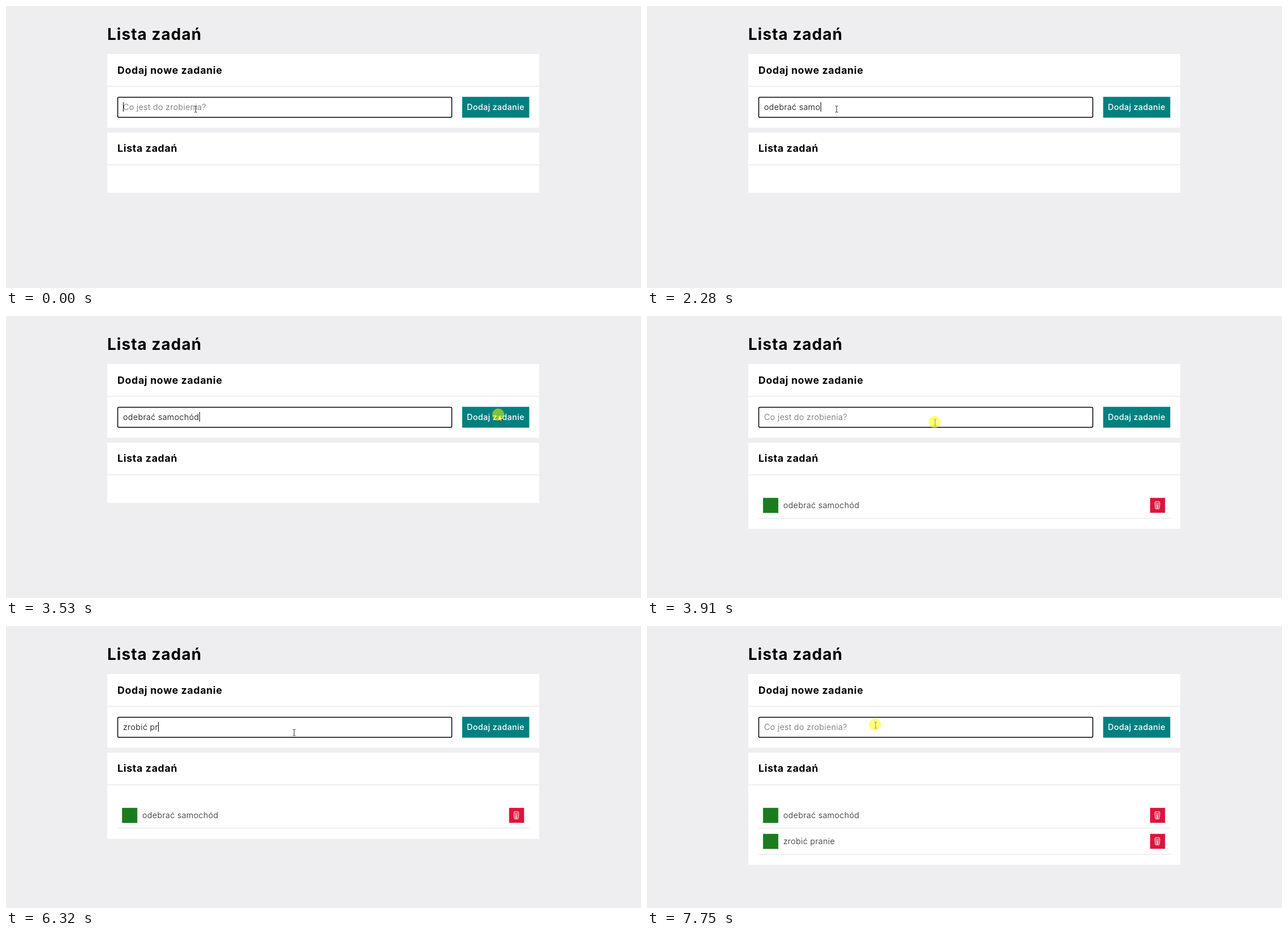
An HTML page that plays this animation: 1123 by 499 pixels, repeating every 8 s.

```html
<!DOCTYPE html>
<html lang="pl">
<head>
<meta charset="utf-8">
<title>Lista zadań</title>
<style>
  html, body { margin: 0; width: 100%; height: 100%; overflow: hidden; background: #eeeef0; }
  svg { display: block; width: 100%; height: 100%; font-family: Inter, "Open Sans", sans-serif; }
  text { font-size: 14.4px; font-weight: 300; letter-spacing: .022em; white-space: pre; }
  .title { font-size: 28px; font-weight: 700; letter-spacing: .036em; }
  .head { font-size: 17.8px; font-weight: 700; letter-spacing: .036em; }
  .label { font-weight: 500; fill: #fff; }
  .item { fill: #222; }
  #hint { fill: #666; }
  .panel { fill: #fff; }
</style>
</head>
<body>
<svg viewBox="0 0 1123 499">
  <defs>
    <g id="bin" fill="none" stroke="#fff" stroke-width=".9">
      <ellipse cx="902.5" cy="329.700" rx="4.600" ry="1.500"/>
      <path d="M898 331l1 10q3.500 1.600 7 0l1-10M900.600 332.500l.5 8M902.500 332.500v8.400M904.400 332.500l-.5 8"/>
    </g>
  </defs>

  <text class="title" x="179" y="60">Lista zadań</text>
  <path class="panel" d="M179 85h764v56h-764zM179 143h764v72.500h-764zM179 224h764v56h-764z"/>
  <rect class="panel" id="list" x="179" y="282" width="764"/>
  <text class="head" x="197" y="119.500">Dodaj nowe zadanie</text>
  <text class="head" x="197" y="258">Lista zadań</text>

  <rect x="197.600" y="161.400" width="590.800" height="35.600" rx="2" fill="#fff" stroke="#000" stroke-width="1.500"/>
  <text id="hint" x="207" y="183.700">Co jest do zrobienia?</text>
  <text id="typed" x="207" y="183.700"></text>
  <rect id="caret" y="170" width="1" height="17"/>

  <rect x="806.700" y="160.700" width="118.700" height="36.900" fill="teal"/>
  <text class="label" x="815" y="183.700">Dodaj zadanie</text>

  <g id="items"></g>

  <path id="beam" d="M-2.500 -5.500h2l.5.5.5-.5h2M0-5V5M-2.500 5.500h2l.5-.5.5.5h2" fill="none" stroke="#333"/>
  <path id="arrow" d="M0 0v11l2.600-2.400 1.900 4 1.800-.8-1.900-3.900h3.500z" fill="#fff" stroke="#000" stroke-width=".8"/>
  <circle id="halo" r="10.700" fill="#ff0" fill-opacity=".5"/>
</svg>
<script>
const LOOP = 8000;
const ROW = 46;

// Each round: the pointer rests over the field, a task is typed, the button is clicked.
// In keys, "|" separates bursts of letters and "_" is a silent beat.
const rounds = [
  { opens: 0, focus: 0, types: 210, click: 3530, blur: 3910,
    keys: "od|eb|ra|ć| |s|a|mo|c|hó|d", field: [335, 182], button: [871, 175] },
  { opens: 3910, focus: 4290, types: 4670, click: 7370, blur: 7370,
    keys: "zr|ob|_i|ć| |pr|a|n|i|e", field: [509, 188], button: [879, 177] },
  { opens: 7750, focus: LOOP, types: LOOP, click: LOOP, blur: LOOP,
    keys: "", field: [404, 175] }
];

const el = id => document.getElementById(id);
const show = (node, on) => node.style.display = on ? "" : "none";
const letters = keys => keys.replace(/[|_]/g, "");
const burstTime = burst => 10 + 200 * burst.length;

function typedBy(t, { keys, types }) {
  const bursts = keys.split("|");
  let due = types - burstTime(bursts[0]);
  return letters(bursts.filter(burst => (due += burstTime(burst)) <= t).join(""));
}

el("items").innerHTML = rounds.slice(0, -1).map(({ keys }, i) => `
  <g transform="translate(0 ${i * ROW})">
    <rect x="205.200" y="321.800" width="27" height="26.700" fill="#1a7c1f"/>
    <text class="item" x="241" y="340">${letters(keys)}</text>
    <rect x="889.700" y="321.800" width="26.500" height="26.500" fill="crimson"/>
    <use href="#bin"/>
    <rect x="197" y="357" width="728.500" height="1.800" fill="#eeeef0"/>
  </g>`).join("");

function drawInput(t, round) {
  const text = typedBy(t, round);
  el("typed").textContent = text.replace(/ /g, "\u00a0");
  show(el("hint"), !text);
  show(el("caret"), t >= round.focus && t < round.blur);
  el("caret").setAttribute("x", Math.round(207 + (text ? el("typed").getComputedTextLength() : 0)));
}

function drawPointer(t, { focus, click, field, button }) {
  const clicking = t >= click;
  const [x, y] = clicking ? button : field;
  show(el("arrow"), clicking);
  show(el("beam"), !clicking);
  show(el("halo"), clicking || t < focus);
  el("arrow").setAttribute("transform", `translate(${x} ${y})`);
  el("beam").setAttribute("transform", `translate(${x + .5} ${y + .5})`);
  el("halo").setAttribute("transform", `translate(${x - .5} ${y - .5})`);
}

function drawList(count) {
  [...el("items").children].forEach((row, i) => show(row, i < count));
  el("list").setAttribute("height", 48.5 + count * ROW);
}

function frame() {
  const t = performance.now() % LOOP;
  const current = rounds.findLastIndex(round => round.opens <= t);
  drawInput(t, rounds[current]);
  drawPointer(t, rounds[current]);
  drawList(current);
  requestAnimationFrame(frame);
}
frame();
</script>
</body>
</html>
```
